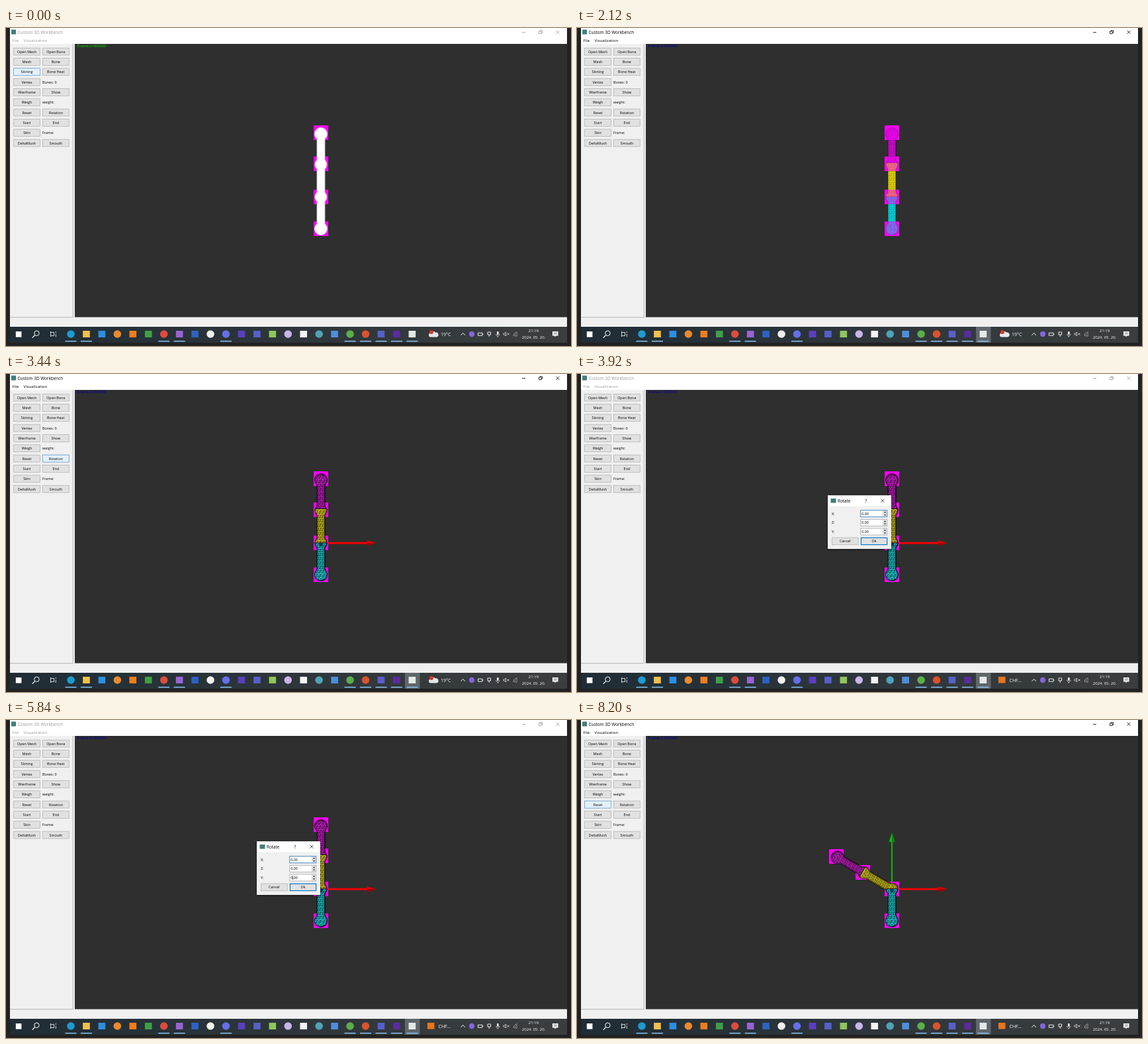
Animation of 854 by 480 pixels, one loop 8.24 s. Source, as an HTML page:

```html
<!DOCTYPE html>
<html lang="en">
<head>
<meta charset="utf-8">
<title>Custom 3D Workbench</title>
<style>
html, body { margin: 0; width: 100%; height: 100%; overflow: hidden; background: #222; }
svg { display: block; width: 854px; height: 480px; }
text { font-family: "Open Sans", "Noto Sans", sans-serif; }
.ui text { font-size: 5.4px; }

[class*="t-"] { animation: 8240ms step-end infinite; }
.t-chrome { animation-name: chrome; }
.t-active { animation-name: active; }
.t-plain { animation-name: plain; }
.t-frame { animation-name: frame; }
.t-wire { animation-name: wire; }
.t-veil { animation-name: veil; }
.t-axes { animation-name: axes; }
.t-dialog { animation-name: dialog; }
.t-caption { animation-name: caption; }
.t-weather { animation-name: weather; }
.t-news { animation-name: news; }
.t-focusx { animation-name: focusx; }
.t-focusy { animation-name: focusy; }
.t-caret { animation-name: caret; }
.t-before { animation-name: before; }
.t-after { animation-name: after; }
.t-skining { animation-name: skining; }
.t-wierframe { animation-name: wierframe; }
.t-rotation { animation-name: rotation; }
.t-reset { animation-name: reset; }
.t-bend { animation-name: bend; transform-origin: 476px 255px; }
.t-top { animation-name: top; }
.t-mid { animation-name: mid; }

@keyframes chrome { 0% { color: #999 } 5.83% { color: #000 } 43.2% { color: #999 } 84.95%, to { color: #000 } }
@keyframes active { 0% { opacity: 0 } 5.83%, to { opacity: 1 } }
@keyframes plain { 0% { opacity: 1 } 5.83%, to { opacity: 0 } }
@keyframes frame { 0% { fill: #00d800 } 23.06%, to { fill: #00009c } }
@keyframes wire { 0% { opacity: 0 } 23.06% { opacity: .4 } 34.47%, to { opacity: .9 } }
@keyframes veil { 0% { opacity: 0 } 23.06% { opacity: .5 } 34.47%, to { opacity: 0 } }
@keyframes axes { 0% { opacity: 0 } 27.9%, to { opacity: 1 } }
@keyframes dialog { 0% { opacity: 0 } 43.2% { opacity: 1 } 84.95%, to { opacity: 0 } }
@keyframes caption { 0% { opacity: 1 } 83.98%, to { opacity: 0 } }
@keyframes weather { 0% { opacity: 1 } 42.48%, to { opacity: 0 } }
@keyframes news { 0% { opacity: 0 } 42.48%, to { opacity: 1 } }
@keyframes focusx { 0% { opacity: 1 } 71.6%, to { opacity: 0 } }
@keyframes focusy { 0% { opacity: 0 } 71.6%, to { opacity: 1 } }
@keyframes caret { 0% { opacity: 0 } 69.2% { opacity: 1 } 76.5%, to { opacity: 0 } }
@keyframes before { 0% { opacity: 1 } 76.5%, to { opacity: 0 } }
@keyframes after { 0% { opacity: 0 } 76.5%, to { opacity: 1 } }
@keyframes skining { 0% { opacity: 1 } 7.28%, to { opacity: 0 } }
@keyframes wierframe { 0% { opacity: 0 } 18.2% { opacity: 1 } 21.84%, to { opacity: 0 } }
@keyframes rotation { 0% { opacity: 0 } 40.05% { opacity: 1 } 43.2%, to { opacity: 0 } }
@keyframes reset { 0% { opacity: 0 } 94.7%, to { opacity: 1 } }
@keyframes bend { 0% { transform: none } 85.4%, to { transform: rotate(-60deg) } }
@keyframes top { 0% { transform: none } 85.4%, to { transform: translate(-84px, 48px) } }
@keyframes mid { 0% { transform: none } 85.4%, to { transform: translate(-44px, 25px) } }
</style>
</head>
<body>
<svg viewBox="0 0 854 480">
  <defs>
    <linearGradient id="bar"><stop stop-color="#202d36"/><stop offset="1" stop-color="#3b3e3f"/></linearGradient>
  </defs>
  <rect x="6" width="842" height="451" fill="#f0f0f0"/>
  <rect x="6" width="842" height="24" fill="#fff"/>
  <rect x="8" y="2.5" width="7" height="7" fill="#3f7f78"/>
  <g class="t-chrome" fill="currentColor">
    <text x="17.5" y="8.7" font-size="6.4">Custom 3D Workbench</text>
    <text x="9.5" y="20.8" font-size="6.1">File</text>
    <text x="26.5" y="20.8" font-size="6.1">Visualization</text>
    <path d="M780 6.5h5M805.5 5h3.6v3.6h-3.6zM807 5V3.7h3.6v3.6h-1.5M831.5 3.8l5 5m0-5l-5 5" fill="none" stroke="currentColor" stroke-width=".8"/>
  </g>
  <path d="M101.3 24V437M6 436.7H101" stroke="#a5a5a5" stroke-width=".8"/>
  <rect x="104" y="24" width="744" height="412.5" fill="#2f2f2f"/>
  <text class="t-frame" x="107.5" y="29.3" style="font:6px 'Liberation Sans',Arial,sans-serif">Frame:0.000000</text>

  <g id="panel" class="ui"></g>

  <g class="t-axes">
    <path d="M476 255.3H549" stroke="#f00000" stroke-width="3"/>
    <path d="M546 251L560 255.3L546 259.6z" fill="#d80000"/>
    <path d="M546 255.3H560L546 259.6z" fill="#a00000"/>
    <path d="M476 255V182" stroke="#12a812" stroke-width="2.4"/>
    <path d="M471.5 184L476 170L480.5 184z" fill="#18b018"/>
    <path d="M476 170L480.5 184H476z" fill="#0e860e"/>
  </g>
  <g id="joints" fill="#f0f" shape-rendering="crispEdges"></g>
  <g id="mesh"></g>
  <g id="veil" class="t-veil" fill="#f0f" shape-rendering="crispEdges"></g>
  <circle class="t-axes" cx="476" cy="257" r="3" fill="#0c2448" fill-opacity=".8"/>

  <g class="t-dialog ui">
    <rect x="377.5" y="182.5" width="99" height="84" rx="2" fill="#000" opacity=".22"/>
    <rect x="379" y="183.3" width="96" height="80.7" fill="#f0f0f0"/>
    <rect x="379" y="183.3" width="96" height="16.2" fill="#fff"/>
    <rect x="383.5" y="188" width="8" height="6.5" fill="#3f7f78"/>
    <text x="394" y="193.9" style="font-size:6.3px">Rotate</text>
    <g class="t-caption">
      <text x="435.3" y="193.9" style="font-size:7px">?</text>
      <path d="M459.4 188.7l5 5m0-5l-5 5" stroke="#111" stroke-width=".75"/>
    </g>
    <g id="fields"></g>
  </g>

  <rect x="6" y="451" width="842" height="24" fill="url(#bar)"/>
  <g id="taskbar"></g>
  <g fill="none" stroke="#fff" stroke-width="1">
    <circle cx="46.4" cy="460.8" r="3.7"/>
    <path d="M43.6 463.6L39.8 467.6" stroke-width="1.3"/>
    <path d="M67.5 458v8M67.5 459.5h5M67.5 464.5h5M72.5 459.5v5M75.3 458v2M75.3 461.5v4.5" stroke-width=".8"/>
    <path d="M687.5 463.7l3.2-3.2 3.2 3.2"/>
    <path d="M713.5 460.2h6.5v4h-6.5zM720.8 461.4v1.6M728 459h4.5v4H728zM730.3 463v3" stroke-width=".9"/>
    <path d="M740.8 462c0 4 5 4 5 0M743.3 465v1.6" stroke-width=".7"/>
    <path d="M752 461h1.5l2-2v6l-2-2H752zM757.5 460.5l3 3m0-3l-3 3" stroke-width=".7"/>
    <path d="M767 465a6 6 0 0 1 6-6M769 465.5a4.2 4.2 0 0 1 4.2-4.2M771 466a2.2 2.2 0 0 1 2.2-2.2" stroke="#b9c0c5" stroke-width=".8"/>
  </g>
  <rect x="742" y="458" width="2.6" height="5" rx="1.3" fill="#fff"/>
  <circle cx="704" cy="462" r="4.2" fill="#8166dc"/>
  <path d="M826 458h8.5v6.5h-3l-2 2v-2H826z" fill="#fff"/>
  <path d="M827.5 460h5.5M827.5 462h5.5" stroke="#1b2830" stroke-width=".6"/>
  <g class="t-weather">
    <path d="M642 466.5a3 3 0 0 1 0-6 4 4 0 0 1 7-1 3.4 3.4 0 0 1 2 7z" fill="#e4e8ec"/>
    <circle cx="643" cy="459" r="3" fill="#d8382e"/>
    <text x="657" y="465" font-size="7" fill="#fff">19°C</text>
  </g>
  <g class="t-news">
    <rect x="637" y="457" width="10.5" height="9.5" fill="#e8761a"/>
    <text x="653.5" y="465" font-size="7" fill="#fff">CHF...</text>
  </g>
  <g fill="#fff" font-size="6" text-anchor="middle">
    <text x="797.5" y="459.4">21:19</text>
    <text x="797.5" y="469.4">2024. 05. 20.</text>
  </g>
</svg>
<script>
const put = (id, html) => { document.getElementById(id).innerHTML = html; };
const rect = (x, y, w, h, attrs) => `<rect x="${x}" y="${y}" width="${w}" height="${h}" ${attrs}/>`;
const text = (x, y, s, attrs = '') => `<text x="${x}" y="${y}" ${attrs}>${s}</text>`;
const MID = 'text-anchor="middle"';

// Side panel
const rows = [
  ['Open Mesh', 'Open Bone'], ['Mesh', 'Bone'], ['Skining', 'Bone Heat'],
  ['Vertex', '=Bones: 0'], ['Wierframe', 'Show'], ['Weigh', '=weight:'],
  ['Reset', 'Rotation'], ['Start', 'End'], ['Skin', '=Frame:'], ['DeltaMush', 'Smouth']
];
const hovered = ['Skining', 'Wierframe', 'Rotation', 'Reset'];

function button(x, y, label) {
  const box = attrs => rect(x + .4, y - 5.4, 39.8, 10.8, attrs);
  return box('fill="#e1e1e1" stroke="#adadad" stroke-width=".7"') +
    (hovered.includes(label)
      ? box(`class="t-${label.toLowerCase()}" fill="#e3f0fb" stroke="#5c9fdb" stroke-width=".7"`) : '') +
    text(x + 20.3, y + 2, label, MID);
}
put('panel', rows.map((row, r) => row.map((label, c) => {
  const x = 11.2 + c * 43.8, y = 35.6 + r * 15.33;
  return label[0] === '=' ? text(55, y + 2, label.slice(1)) : button(x, y, label);
}).join('')).join(''));

// Dialog fields
function field(name, i) {
  const y = 205.8 + i * 13.6;
  const focus = { X: 't-focusx', Y: 't-focusy' }[name];
  const box = attrs => rect(428.8, y, 40, 10, attrs);
  const value = name === 'Y'
    ? text(430.3, y + 7, '0,00', 'class="t-before"') + text(430.3, y + 7, '60,00', 'class="t-after"') +
      rect(433.4, y + 1.8, .5, 6.6, 'class="t-caret"')
    : text(430.3, y + 7, '0,00');
  return text(385, y + 7, name + ':') +
    box('fill="#fff" stroke="#8a8a8a" stroke-width=".6"') +
    rect(462.4, y + .4, 6, 9.2, 'fill="#e6e6e6" stroke="#aaa" stroke-width=".4"') +
    `<path d="M463.8 ${y + 3.8}l1.7-2 1.7 2zM463.8 ${y + 6.2}l1.7 2 1.7-2z" fill="#222"/>` +
    (focus ? box(`class="${focus}" fill="none" stroke="#2b86d3" stroke-width=".7"`) : '') + value;
}
put('fields', ['X', 'Z', 'Y'].map(field).join('') + button(385, 252.4, 'Cancel') +
  button(428.8, 252.4, 'Ok') +
  rect(429.4, 247.2, 39.2, 10.4, 'fill="none" stroke="#0078d7" stroke-width="1.1"'));

// Taskbar: c = circle, s = square
const apps = ('c1d9bd1 sf2c14b s2a8fe0 ce98a2d sef7d1a s3f9f45 cdd4b3e s9b62d6 s2b62c4 cf0f0f0 ' +
  'c6470e8 s5a3fc0 s5660c8 s8fc65a cc9b4ea sf4f4f4 c4fa3b5 s4d8fdb c5cae4a cd9532c ' +
  's5660c8 s5b2ba0 se4e9e8').split(' ');
const running = [0, 1, 6, 7, 10, 18, 19, 20, 21, 22];
put('taskbar', rect(603, 451, 22.5, 24, 'class="t-active" fill="#5f676b"') +
  rect(14.8, 458, 8.6, 8.6, 'fill="#fff"') +
  apps.map((app, i) => {
    const x = 98 + i * 23.45, fill = `fill="#${app.slice(1)}"`;
    return (app[0] === 'c' ? `<circle cx="${x}" cy="462" r="5.8" ${fill}/>` : rect(x - 5.3, 457, 10.6, 10, fill)) +
      (running.includes(i) ? rect(x - 8.5, 472, 17, 1.5, 'fill="#86c0ee"') : '');
  }).join(''));

// Arm: a tube with a ball at each joint
const CX = 476, balls = [[160, 9.6], [206, 9], [255, 9], [303, 9.6]];
const TOP = 150.4, END = 312.6;
function half(y) {
  const tube = y > 160 && y < 303 ? 6 : 0;
  return Math.max(tube, ...balls.map(([c, r]) => Math.sqrt(Math.max(0, r * r - (y - c) ** 2))));
}
const pt = (x, y) => x.toFixed(2) + ' ' + y.toFixed(2);

function outline(y0, y1) {
  const left = [], right = [];
  const n = Math.ceil((y1 - y0) * 2);
  for (let i = 0; i <= n; i++) {
    const y = y0 + (y1 - y0) * i / n, w = half(y);
    left.push(pt(CX - w, y));
    right.unshift(pt(CX + w, y));
  }
  return 'M' + left.concat(right).join('L') + 'z';
}
function wire(y0, y1) {
  const n = Math.round((y1 - y0) / 3.2), cols = 5;
  const at = (i, k) => {
    const y = y0 + (y1 - y0) * i / n;
    const a = ((k + (i % 2) / 2) / cols - .5) * Math.PI;
    return pt(CX + half(y) * Math.sin(Math.min(a, Math.PI / 2)), y);
  };
  let d = '';
  for (let i = 0; i < n; i++) {
    const ring = [], zigzag = [];
    for (let k = 0; k <= cols; k++) {
      ring.push(at(i, k));
      zigzag.push(at(i, k), at(i + 1, k));
    }
    d += 'M' + ring.join('L') + 'M' + zigzag.join('L');
  }
  return d;
}
function bone(y0, y1, fill) {
  const d = outline(y0, y1);
  return `<path d="${d}" fill="${fill}" stroke="#000" stroke-opacity=".35" stroke-width=".5"/>
    <g class="t-wire"><path d="${d}" fill="#888" fill-opacity=".3" stroke="#000" stroke-width=".7"/>
    <path d="${wire(y0, y1)}" fill="none" stroke="#000" stroke-width=".5"/></g>`;
}
const squares = [147, 194, 244, 292].map((y, i) =>
  rect(465, y, 22, 22, `class="${['t-top', 't-mid', '', ''][i]}"`)).join('');
put('joints', squares);
put('veil', squares);
put('mesh', `<g class="t-plain"><path d="${outline(TOP, END)}" fill="#fff" stroke="#c4c4c4" stroke-width="1"/>
  <path d="M${CX} 160V303" stroke="#fff" stroke-width="8"/></g>
  <g class="t-active"><g class="t-bend">${bone(TOP, 206, '#e800e8')}${bone(203.5, 262.5, '#ffee00')}</g>
  ${bone(255, END, '#00f0f8')}</g>`);
</script>
</body>
</html>
```
